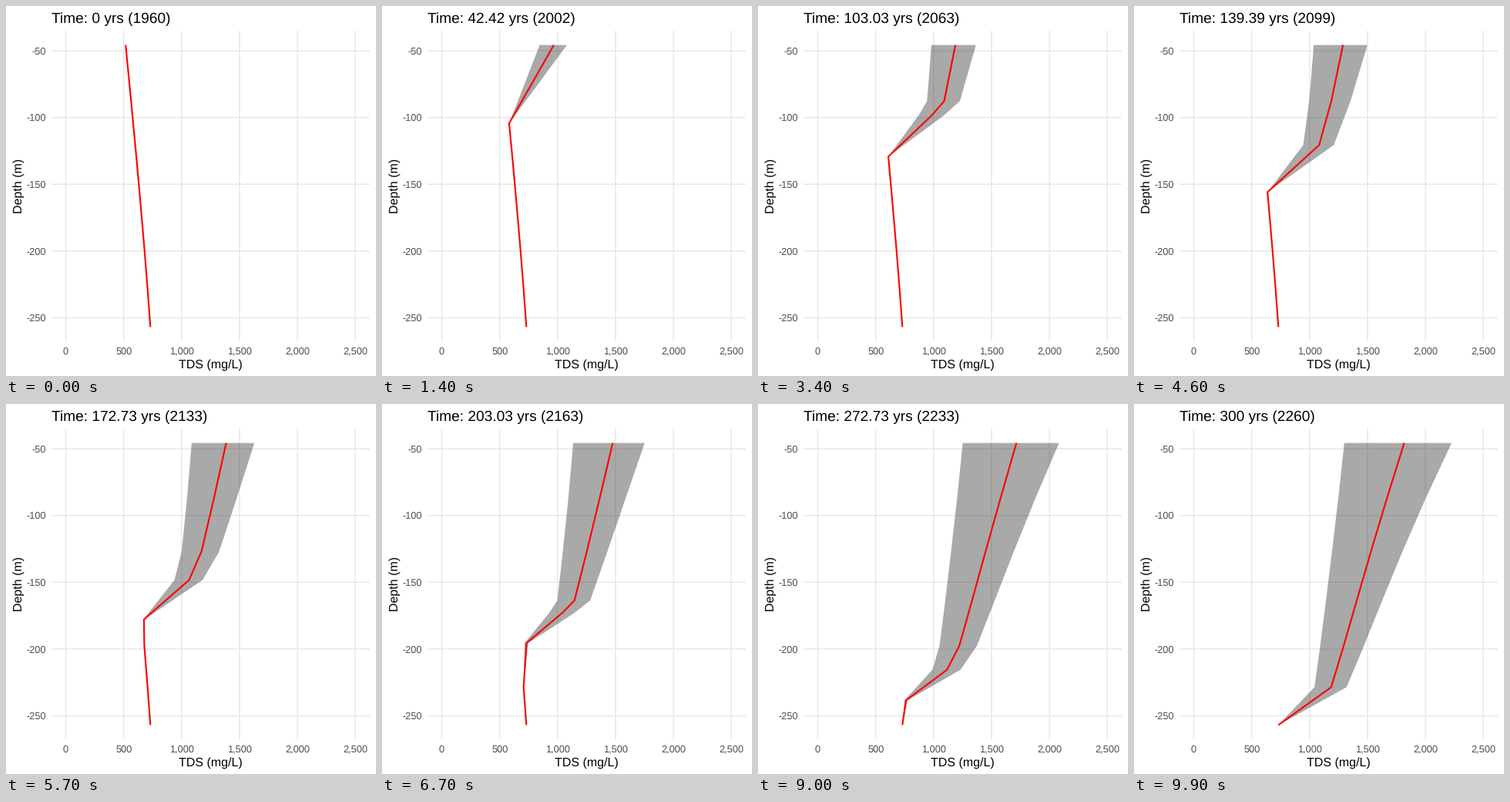
Write a matplotlib script that moves like this. It is 480 by 480 pixels and loops after 10000 ms.

```python
import matplotlib.pyplot as plt
import numpy as np
from matplotlib.animation import FuncAnimation
from matplotlib.patches import Polygon

SIZE, DPI = 480, 100
FRAMES, YEARS, STEP = 100, 300, 50
PT = 72 / DPI  # points per pixel

plt.rcParams.update({"font.family": "Liberation Sans", "text.hinting": "none"})

# Initial profile of the seven layers, in stage pixels
K = np.arange(7)
NODES = np.column_stack([155.2 + 7.45 * K - 0.35 * K**2,
                         50.6 + 75.2 * K - 2.37 * K**2])
Y = NODES[:, 1]

# Salted layers by age: start, linear and cubic growth per step
MID = (235, 19.7, 0.136)
LOW = (213.3, 11, 0.036)
HIGH = (255, 25.9, 0.22)


def lerp(a, b, u):
    return np.asarray(a) * (1 - u) + np.asarray(b) * u


def salted(curve, step, k):
    """Position of salted layer k after the given number of steps."""
    start, slope, cubic = curve
    age = step - 1 - k
    return np.array([start + slope * age + cubic * age**3 + 5.3 * k**0.85, Y[k]])


def profile(curve, step, u):
    """Points of one curve, a share u of the way from step to step + 1."""
    if step == 0:
        # The upper line folds up onto the first salted segment
        top = salted(curve, 1, 0)
        share = (Y[:5] - Y[0]) / (Y[4] - Y[0])
        pts = [lerp(NODES[k], lerp(top, NODES[1], share[k]), u) for k in range(5)]
        rest = NODES[Y > pts[-1][1]]
    else:
        pts = [lerp(salted(curve, step, k), salted(curve, step + 1, k), u)
               for k in range(step)]
        # Knee and front leave from points on the sloping segment
        upper, lower = salted(curve, step, step - 1), NODES[step]
        knee = lerp(upper, lower, 0.23)
        front = lerp(upper, lower, min(1, 1.12 - 0.06 * step))
        pts.append(lerp(knee, salted(curve, step + 1, step), u))
        pts.append(lerp(front, NODES[step + 1], u))
        rest = NODES[step + 1:]
    return np.vstack([pts, rest])


fig = plt.figure(figsize=(SIZE / DPI, SIZE / DPI), dpi=DPI, facecolor="white")
ax = fig.add_axes([0, 0, 1, 1])
ax.set(xlim=(0, SIZE), ylim=(SIZE, 0))
ax.axis("off")


def label(x, y, text, px, color="black", **kw):
    return ax.text(x, y, text, fontsize=px * PT, color=color, va="baseline", **kw)


grid = dict(color="#e8e8e8", lw=1.55 * PT, solid_capstyle="butt",
            snap=False, zorder=1)
for i in range(6):
    x = 77.5 + 75.14 * i
    ax.plot([x, x], [32, 435], **grid)
    label(x, 451.6, f"{500 * i:,}", 12.8, "#4d4d4d", ha="center")
for i in range(5):
    y = 58.1 + 86.6 * i
    ax.plot([59, 472], [y, y], **grid)
    label(51.5, y + 4.6, f"-{50 * (i + 1)}", 12.8, "#4d4d4d", ha="right")

label(265.5, 469.6, "TDS (mg/L)", 16, ha="center")
label(21, 233.5, "Depth (m)", 16, rotation=90, rotation_mode="anchor", ha="center")
title = label(59, 22, "", 19.2)

band = Polygon(np.zeros((3, 2)), facecolor="#333333", alpha=0.42, lw=0, zorder=2)
ax.add_patch(band)
(line,) = ax.plot([], [], color="red", lw=2.13 * PT, zorder=3,
                  solid_capstyle="butt", solid_joinstyle="round")


def update(frame):
    years = YEARS * frame / (FRAMES - 1)
    step = min(int(years / STEP + 1e-9), YEARS // STEP - 1)
    u = years / STEP - step
    title.set_text(f"Time: {round(years, 2):g} yrs ({1960 + round(years)})")
    line.set_data(*profile(MID, step, u).T)
    low, high = (profile(curve, step, u) for curve in (LOW, HIGH))
    band.set_xy(np.vstack([low, high[::-1]]))
    return title, line, band


anim = FuncAnimation(fig, update, frames=FRAMES, interval=100,
                     repeat=True, repeat_delay=0, blit=False)
plt.show()
```
